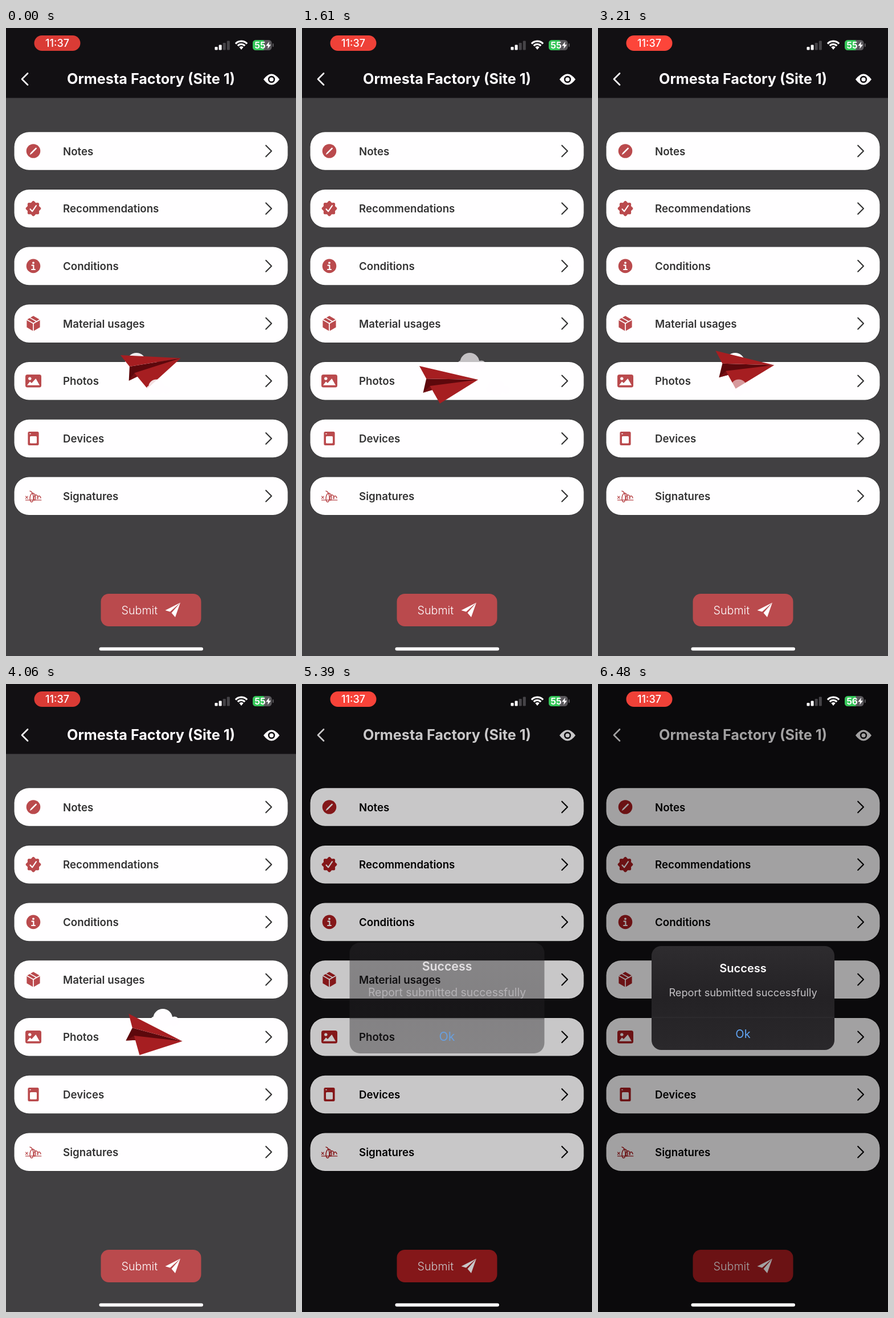
Write an HTML page with a canvas that moves like this. It is 509 by 1100 pixels and loops after 6550 ms.

```html
<!DOCTYPE html>
<html lang="en">
<head>
<meta charset="utf-8">
<title>Report submit</title>
<style>
html, body { margin: 0; width: 100%; height: 100%; overflow: hidden; background: #121013; }
canvas { display: block; width: 509px; height: 1100px; }
</style>
</head>
<body>
<canvas id="stage"></canvas>
<script>
const W = 509, H = 1100, MID = W / 2, TAU = Math.PI * 2;
const LOOP = 6550;
const CYCLE = 2920;           // one flight of the loader
const DONE = 5285;            // loader closes, dialog opens
const RED = '#a81d20', INK = '#121013', WHITE = '#fffdff', GREY = '#59575b';
const FONT = 'Inter, "Open Sans", sans-serif';

const canvas = document.getElementById('stage');
const dpr = window.devicePixelRatio || 1;
canvas.width = W * dpr;
canvas.height = H * dpr;
const c = canvas.getContext('2d');
c.scale(dpr, dpr);
c.lineCap = c.lineJoin = 'round';

const mod = (a, n) => ((a % n) + n) % n;
const clamp = v => Math.max(0, Math.min(1, v));

function box(x, y, w, h, r, fill) {
  c.beginPath();
  c.roundRect(x, y, w, h, r);
  c.fillStyle = fill;
  c.fill();
}
function disc(x, y, r, fill) {
  c.beginPath();
  c.arc(x, y, r, 0, TAU);
  c.fillStyle = fill;
  c.fill();
}
// Path through [x, y] points
function trace(pts) {
  c.beginPath();
  for (const p of pts) c.lineTo(...p);
}
function poly(fill, ...pts) {
  trace(pts);
  c.fillStyle = fill;
  c.fill();
}
function line(color, width, ...pts) {
  trace(pts);
  c.strokeStyle = color;
  c.lineWidth = width;
  c.stroke();
}
function label(str, x, y, size, weight, fill, align = 'center') {
  c.font = `${weight} ${size}px ${FONT}`;
  c.textAlign = align;
  c.fillStyle = fill;
  c.fillText(str, x, y);
}
function chevron(x, y, size, color, width) {
  const s = Math.abs(size);
  line(color, width, [x - size, y - s], [x, y], [x - size, y + s]);
}
// Points of f(0..1), for curves given by a formula
const sample = (n, f) => Array.from({ length: n + 1 }, (_, i) => f(i / n));
const polar = (r, a) => [r * Math.cos(a), r * Math.sin(a)];

// Row icons, each drawn around 0,0
const rows = {
  Notes() {
    disc(0, 0, 12.3, RED);
    line(WHITE, 1.2, [-5.5, 5.5], [0, 0]);
    line(WHITE, 2.6, [-3.8, 3.8], [4.7, -4.7]);
  },
  Recommendations() {
    poly(RED, ...sample(96, s => polar(12.2 + 1.2 * Math.cos(8 * s * TAU), s * TAU)));
    line(WHITE, 2.1, [-5.5, 1], [-1.8, 5], [5, -5]);
  },
  Conditions() {
    disc(0, 0, 12.3, RED);
    disc(0, -5.6, 1.9, WHITE);
    line(WHITE, 2.2, [-2.5, -1.2], [0.4, -1.2], [0.4, 6]);
    line(WHITE, 2, [-3, 6.2], [3, 6.2]);
  },
  'Material usages'() {
    const hex = sample(6, s => polar(13.4, s * TAU - TAU / 12));
    poly(RED, ...hex);
    for (const k of [0, 2, 4]) line(WHITE, 1.7, [0, 0], hex[k].map(v => v * 0.98));
    line(WHITE, 1.6, [-6, -10], [6, -3.4]);
  },
  Photos() {
    box(-14, -11.3, 28, 22.6, 3.5, RED);
    disc(-6.2, -4.2, 2.7, WHITE);
    poly(WHITE, [-11, 7.5], [-6, 1], [-3, 3.6], [4.3, -4.2], [11, 7.5]);
  },
  Devices() {
    box(-9.6, -12, 19.2, 24, 2.5, RED);
    box(-6, -4, 12, 12.5, 1.5, WHITE);
    line(WHITE, 1.6, [-6, -8.2], [-5, -8.2]);
  },
  Signatures() {
    line(RED, 1.3, [-13.5, 7.2], [13.8, 7.2]);
    for (const k of [-2, 2]) line(RED, 1.2, [-13.5, 2.5 - k], [-9.8, 2.5 + k]);
    line(RED, 1.5, ...sample(80, s => {
      const size = 1.6 + 9 * (1 - s) ** 1.6, a = s * 3.5 * TAU;
      return [-6 + 19 * s + 0.5 * size * Math.sin(a), 2 - size * Math.cos(a)];
    }));
  }
};

function header() {
  chevron(28, 89.5, -10, WHITE, 2.7);
  label('Ormesta Factory (Site 1)', MID, 98.3, 25.2, 700, WHITE);
  c.beginPath();
  c.moveTo(452, 90);
  c.quadraticCurveTo(466, 71, 480, 90);
  c.quadraticCurveTo(466, 109, 452, 90);
  c.fillStyle = WHITE;
  c.fill();
  disc(466, 90, 6.2, INK);
  disc(466, 90, 3.6, WHITE);
}

function card(name, i) {
  const top = 182.2 + i * 100.7, mid = top + 33.3;
  box(14, top - 0.7, 481, 68, 26.5, '#000');
  box(14.5, top, 480, 66.6, 26, WHITE);
  c.save();
  c.translate(48, mid);
  rows[name]();
  c.restore();
  label(name, 100, mid + 7, 18.7, 600, '#000', 'left');
  chevron(466, mid, 9.8, '#000', 2.1);
}

function page() {
  c.fillStyle = INK;
  c.fillRect(0, 0, W, H);
  header();
  Object.keys(rows).forEach(card);
  box(166.5, 991, 176, 57, 14, RED);
  label('Submit', 202.5, 1026.5, 19.7, 300, WHITE, 'left');
  const tip = [306, 1006.5];
  poly(WHITE, tip, [279.5, 1020], [288, 1022.5]);
  poly(WHITE, tip, [290.5, 1024.5], [297, 1032]);
}

// Lightens all below the header while loading
function veil() {
  c.fillStyle = 'rgba(255,253,255,.2)';
  c.fillRect(0, 122.5, W, H);
}

function cloud(x, y, r, alpha) {
  c.globalAlpha = clamp(alpha);
  c.beginPath();
  for (const [dx, dy, k] of [[0, 0, 1], [-0.85, 0.2, 0.42], [1.2, 0.3, 0.5]]) {
    c.moveTo(x + (dx + k) * r, y + dy * r);
    c.arc(x + dx * r, y + dy * r, k * r, 0, TAU);
  }
  c.fillStyle = WHITE;
  c.fill();
  c.globalAlpha = 1;
}

function plane(t) {
  const wave = peak => Math.cos((t - peak) / CYCLE * TAU);
  const tilt = wave(940);
  const nose = [54, -19], tail = [-52, -19], notch = [-35, 0];
  const keel = [-35, 25], fold = [-26, 11], seam = [-19, 16];
  c.save();
  c.translate(252.2 + 0.8 * tilt, 608.5 - 14 * wave(60));
  c.rotate((10.7 + 18 * tilt) / 360 * TAU);
  poly('#5d080c', nose, notch, keel, seam);
  poly('#750f13', fold, keel, seam);
  poly('#a61e21', nose, tail, notch);
  poly('#a61e21', nose, [-2, 37], fold);
  c.restore();
}

function loader(t) {
  const fade = p => Math.min(p / 720, (CYCLE - p) / 950);
  const back = mod(t + 660, CYCLE), front = mod(t + 2100, CYCLE);
  cloud(202 + back * 0.0407, 586, 17, fade(back));
  plane(t);
  cloud(387 - front * 0.0586, 629.5, 14, fade(front));
}

function dialog(p) {
  c.fillStyle = `rgba(0,0,0,${0.365 * p})`;
  c.fillRect(0, 0, W, H);
  const s = 1 + 0.16 * (1 - p);
  const shade = c.createLinearGradient(0, -91, 0, 91);
  ['#2e2c2f', '#242225', '#2a282b'].forEach((tone, i) => shade.addColorStop(i / 2, tone));
  c.save();
  c.translate(MID, 550);
  c.scale(s, s);
  c.globalAlpha = p ** 1.65;
  box(-160.5, -91, 321, 182, 17, shade);
  box(-160.5, 33.5, 321, 1, 0, '#333134');
  c.globalAlpha = Math.sqrt(p);
  label('Success', 0, -45, 20, 600, WHITE);
  label('Report submitted successfully', 0, -3, 18.2, 400, '#c3c1c4');
  label('Ok', 0, 70, 20, 400, '#62a6f6');
  c.restore();
}

function wifi(x, y) {
  const fan = r => {
    c.beginPath();
    c.arc(x, y, r, -0.76 * Math.PI, -0.24 * Math.PI);
  };
  c.strokeStyle = c.fillStyle = WHITE;
  c.lineWidth = 3.2;
  c.lineCap = 'butt';
  for (const r of [13.8, 8.6]) {
    fan(r);
    c.stroke();
  }
  c.lineCap = 'round';
  fan(5);
  c.lineTo(x, y + 1);
  c.fill();
}

function battery(level) {
  box(433, 21, 33.5, 18, 5.5, GREY);
  box(433, 21, 19.5, 18, [5.5, 0, 0, 5.5], '#35c759');
  box(467.8, 27, 2, 6, 1, GREY);
  label(level, 446, 35.6, 15.5, 700, WHITE);
  // Bolt: one half, then the same turned around
  const half = [[1.4, -6.4], [-4.4, 1], [-0.6, 1]];
  const bolt = [...half, ...half.map(([x, y]) => [-x, -y])];
  poly(WHITE, ...bolt.map(([x, y]) => [x + 460.6, y + 30.2]));
}

function statusBar(t) {
  const glow = (0.5 - 0.5 * Math.cos((t - 40) / 2000 * TAU)) ** 0.6;
  box(49.5, 13, 81, 27, 13.5, `rgb(${217 + 38 * glow},${59 + 10 * glow},${53 + 5 * glow})`);
  label('11:37', 90, 33.3, 18, 500, WHITE);
  for (let i = 0; i < 4; i++) {
    const h = 5.5 + i * 3.5;
    box(366.5 + i * 7.1, 38.5 - h, 5, h, 1.2, i < 2 ? WHITE : '#464448');
  }
  wifi(413, 37);
  battery(t < 6030 ? '55' : '56');
}

function draw(t) {
  page();
  if (t < DONE) {
    veil();
    loader(t);
  } else {
    const x = (t - DONE) * 0.019;
    dialog(1 - (1 + x) * Math.exp(-x));
  }
  statusBar(t);
  box(163.5, 1084.7, 182.5, 5.8, 2.9, WHITE);
}

let start;
function tick(now) {
  start ??= now;
  draw((now - start) % LOOP);
  requestAnimationFrame(tick);
}
draw(0);
requestAnimationFrame(tick);
</script>
</body>
</html>
```
